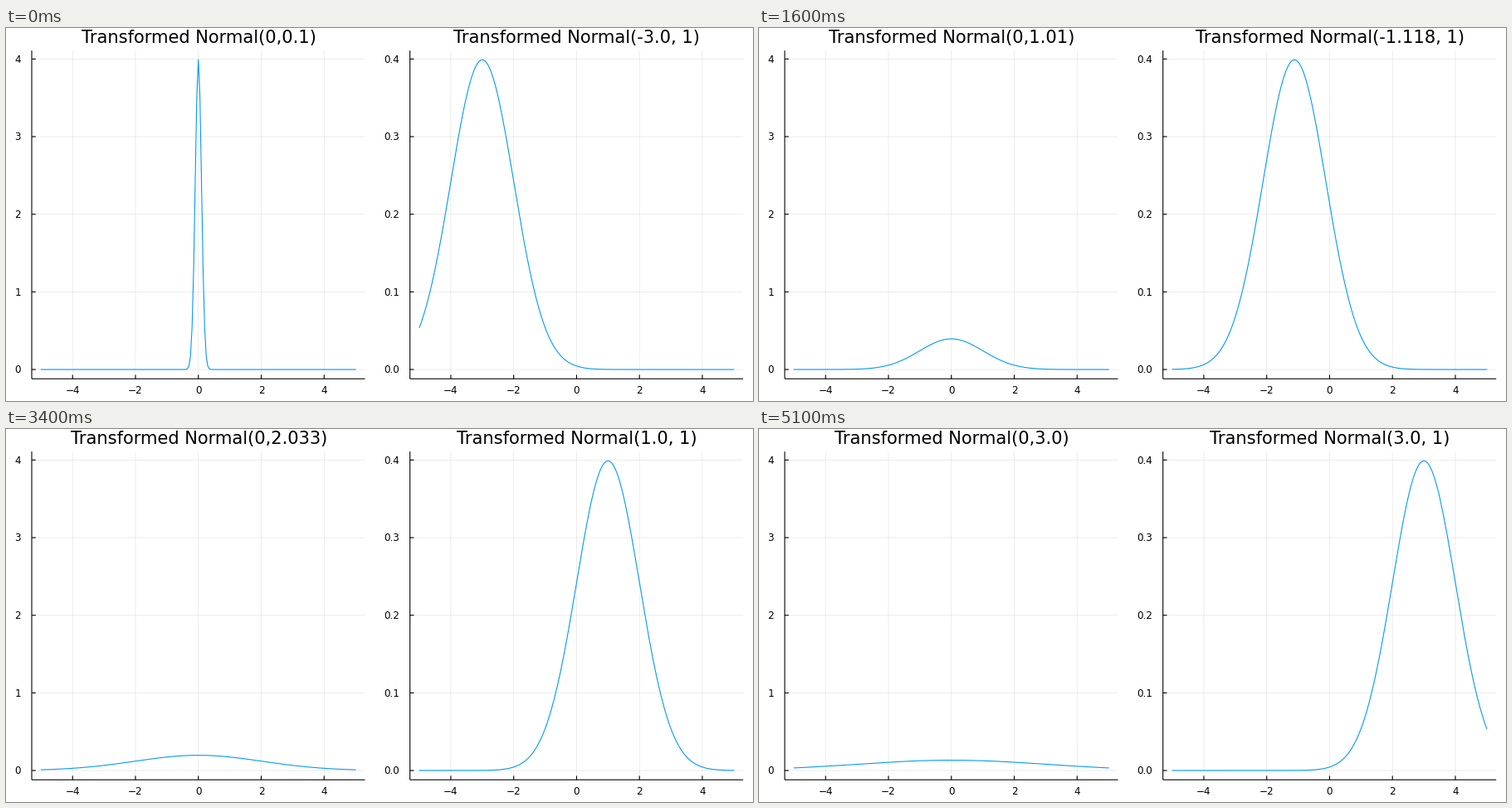
Recreate the animation shown at these times as a matplotlib script. Size 900 by 450 pixels, loop 5.2 s.

```python
import numpy as np
import matplotlib.pyplot as plt
from matplotlib.animation import FuncAnimation

W, H, DPI = 900, 450, 100
FRAMES, INTERVAL = 52, 100
PX = 72 / DPI  # points per pixel

TOP, BOTTOM, BASE = 27.2, 423.2, 412.0
PANEL_W = 401.5
X_UNIT = PANEL_W / 10.6
PEAK_H = BASE - 38.4
PEAK = 1 / np.sqrt(2 * np.pi)
BLUE = "#009AFA"

plt.rcParams["font.family"] = "DejaVu Sans"
plt.rcParams["path.snap"] = False

fig = plt.figure(figsize=(W / DPI, H / DPI), dpi=DPI, facecolor="white")
ax = fig.add_axes([0, 0, 1, 1])
ax.set_xlim(0, W)
ax.set_ylim(H, 0)
ax.axis("off")

xs = np.linspace(-5, 5, 201)


def normal(x, mu, sigma):
    return PEAK / sigma * np.exp(-0.5 * ((x - mu) / sigma) ** 2)


def segment(x, y, width=1.1, alpha=1.0, z=2):
    ax.plot(x, y, color="black", lw=width * PX, alpha=alpha, zorder=z,
            solid_capstyle="butt", snap=False)


def label(x, y, text, size, ha="center"):
    return ax.text(x, y, text, fontsize=size * PX, ha=ha, va="baseline")


class Panel:
    def __init__(self, left, y_max, y_ticks):
        self.left, self.right = left, left + PANEL_W
        self.mid = left + PANEL_W / 2
        self.y_unit = PEAK_H / y_max
        self.draw_axes(y_ticks)
        self.curve, = ax.plot([], [], color=BLUE, lw=1.1 * PX, zorder=3,
                              snap=False)
        self.title = label(self.mid + 0.45, 18, "", 21)

    def to_y(self, v):
        return BASE - v * self.y_unit

    def draw_axes(self, y_ticks):
        for v in range(-4, 5, 2):
            x = self.mid + v * X_UNIT
            segment([x, x], [TOP, BOTTOM], 0.7, 0.1, 1)
            segment([x, x], [BOTTOM, BOTTOM - 4.8])
            label(x, 441.3, str(v).replace("-", "\u2212"), 12)
        for v in y_ticks:
            y = self.to_y(v)
            segment([self.left, self.right], [y, y], 0.7, 0.1, 1)
            segment([self.left, self.left + 4.8], [y, y])
            label(self.left - 12.8, y + 4.4, str(v), 12, "right")
        segment([self.left, self.left], [TOP, BOTTOM])
        segment([self.left, self.right], [BOTTOM, BOTTOM])

    def show(self, mu, sigma, params):
        self.curve.set_data(self.mid + xs * X_UNIT,
                            self.to_y(normal(xs, mu, sigma)))
        self.title.set_text(f"Transformed Normal({params})")


scale_panel = Panel(31.0, PEAK / 0.1, range(5))
shift_panel = Panel(486.7, PEAK, [0.0, 0.1, 0.2, 0.3, 0.4])


def update(i):
    t = i / (FRAMES - 1)
    sigma = 0.1 + 2.9 * t
    mu = -3 + 6 * t
    scale_panel.show(0, sigma, f"0,{round(sigma, 3)}")
    shift_panel.show(mu, 1, f"{round(mu, 3)}, 1")
    return (scale_panel.curve, scale_panel.title,
            shift_panel.curve, shift_panel.title)


anim = FuncAnimation(fig, update, frames=FRAMES, interval=INTERVAL,
                     init_func=lambda: update(0), repeat=True,
                     repeat_delay=0, blit=False)
plt.show()
```
